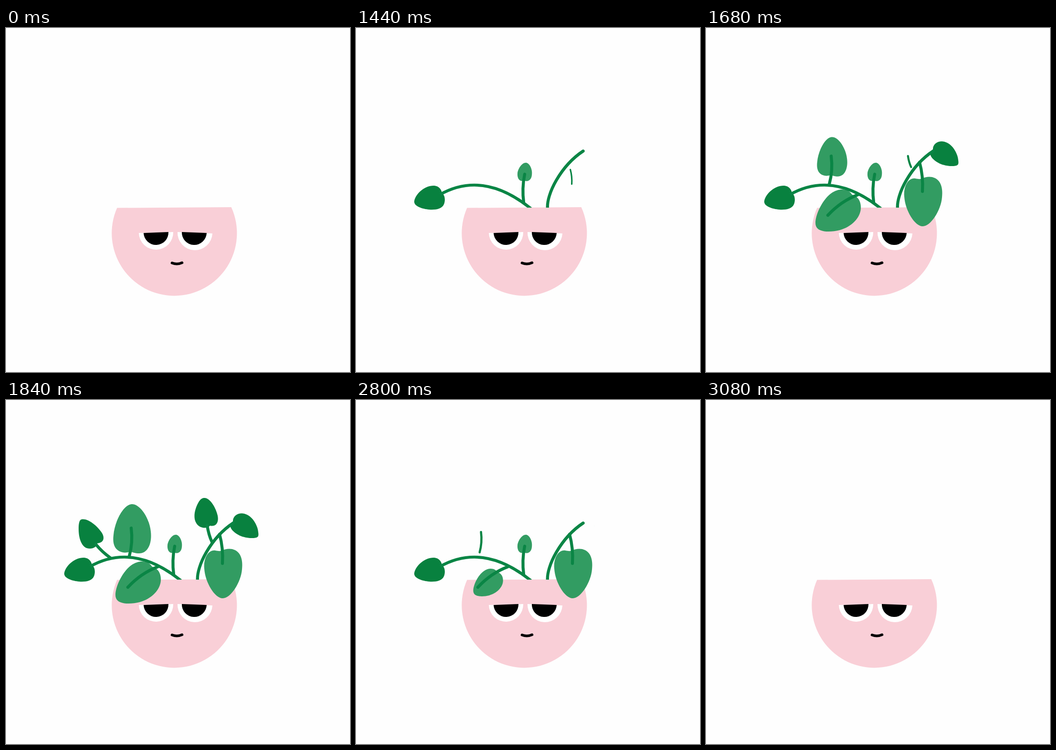
These frames come from a looping animation (720 px wide and 720 px high, 4.16 s). An HTML page:

```html
<!DOCTYPE html>
<html lang="en">
<head>
<meta charset="utf-8">
<title>Potted plant</title>
<style>
html, body { margin: 0; height: 100%; overflow: hidden; background: #fefefe; }
svg { display: block; width: 100%; height: 100%; filter: blur(.6px); }
#plant path { transform-box: fill-box; transform-origin: center; }
.pale { fill: #329c62; }
.dark { fill: #08813f; }
.stem { fill: none; stroke: #0a8545; stroke-width: 6.3; stroke-linecap: round; }
.flat { stroke-linecap: butt; }
</style>
</head>
<body>
<svg viewBox="0 0 720 720">
  <clipPath id="above"><rect width="720" height="376"/></clipPath>
  <path fill="#f9cfd7" d="M232.500 376.500A131 131 0 1 0 471.500 375Z"/>
  <g fill="#fff">
    <path d="M278 429A36 36 0 0 0 350 427Z"/>
    <path d="M359 427A36.500 36.500 0 0 0 432 430Z"/>
  </g>
  <path d="M288 429A26 26 0 0 0 340 427Z"/>
  <path d="M368 427A26 26 0 0 0 420 429Z"/>
  <path d="M347.500 491.800Q358 496 368.500 491.300" fill="none" stroke="#000" stroke-width="5.500" stroke-linecap="round"/>
  <g id="plant"></g>
</svg>
<script>
const LOOP = 4160, STEP = 40;

// class, start and end of growth in ms, outline; later parts lie on top
const parts = [
  ['pale', 1320, 1400, 'M356 282C364 283 370 297 368 308C367 318 360 323 351 319C343 323 337 315 338 304C339 294 348 281 356 282Z'],
  ['pale', 1440, 1540, 'M454 415C438 416 417 383 415 353C413 330 424 313 438 315C445 316 447 317 452 315C460 311 471 310 479 314C492 320 496 336 494 354C492 382 470 415 454 415Z'],
  ['pale', 1520, 1620, 'M230 414C225 400 241 361 262 346C280 333 299 337 306 349C318 352 325 363 324 378C323 397 305 416 280 423C260 428 234 428 230 414Z'],
  ['pale', 1600, 1700, 'M263 218C280 217 300 246 303 275C306 300 297 321 279 321C270 321 266 319 260 317C254 320 246 320 241 318C226 313 223 299 225 283C227 256 245 219 263 218Z'],
  ['dark', 1240, 1320, 'M122 362C125 346 145 329 164 330C174 331 179 338 180 346C187 350 187 362 184 369C180 379 166 381 153 380C139 379 120 373 122 362Z'],
  ['dark', 1585, 1660, 'M526 287C520 291 497 289 486 282C473 275 465 264 472 257C475 255 475 254 475 252C476 241 488 235 499 238C515 242 527 262 528 277C529 283 528 286 526 287Z'],
  ['dark', 1680, 1760, 'M415 205C427 204 440 227 443 242C446 257 439 266 427 263C421 270 406 269 399 259C390 246 396 226 403 214C407 207 411 205 415 205Z'],
  ['dark', 1760, 1840, 'M158 250C170 247 190 262 200 277C208 289 204 299 191 300C190 309 179 313 169 310C156 305 152 285 152 270C152 260 153 251 158 250Z'],
  ['stem main flat', 1239, 1240, 'M176 348.500C232 317 296 321 366 378'],
  ['stem main', 1340, 1440, 'M401 378C398 349 428 289 475.500 257.500'],
  ['stem', 1280, 1360, 'M351 365Q347 336 353 306'],
  ['stem', 1400, 1480, 'M447 281Q455 310 453 342'],
  ['stem', 1460, 1540, 'M318 349Q283 362 255 392'],
  ['stem', 1535, 1605, 'M262 268Q266 298 258 327'],
  ['stem', 1640, 1700, 'M421 262Q424 282 431 297'],
  ['stem', 1720, 1800, 'M188 302Q201 318 218 330']
];

const plant = document.getElementById('plant');
const add = (tag, parent) =>
  parent.appendChild(document.createElementNS('http://www.w3.org/2000/svg', tag));

const shapes = parts.map(([cls, start, end, d]) => {
  const layer = add('g', plant);
  // main stems end at the rim of the pot
  if (cls.includes('main')) layer.setAttribute('clip-path', 'url(#above)');
  const el = add('path', layer);
  el.setAttribute('class', cls);
  el.setAttribute('d', d);
  return { el, start, end };
});

// The plant shrinks in reverse order, about a third faster than it grows.
const growth = t => t < 2600 ? t : 1800 - (t - 2640) * 1.34;

function draw(now) {
  const g = growth(Math.floor(now % LOOP / STEP) * STEP);
  for (const { el, start, end } of shapes) {
    const s = Math.min(1, Math.max(0, (g - start) / (end - start)));
    el.style.visibility = s ? 'visible' : 'hidden';
    el.style.transform = `scale(${s})`;
  }
}

const begin = performance.now();
function tick() {
  draw(performance.now() - begin);
  requestAnimationFrame(tick);
}
tick();
</script>
</body>
</html>
```
